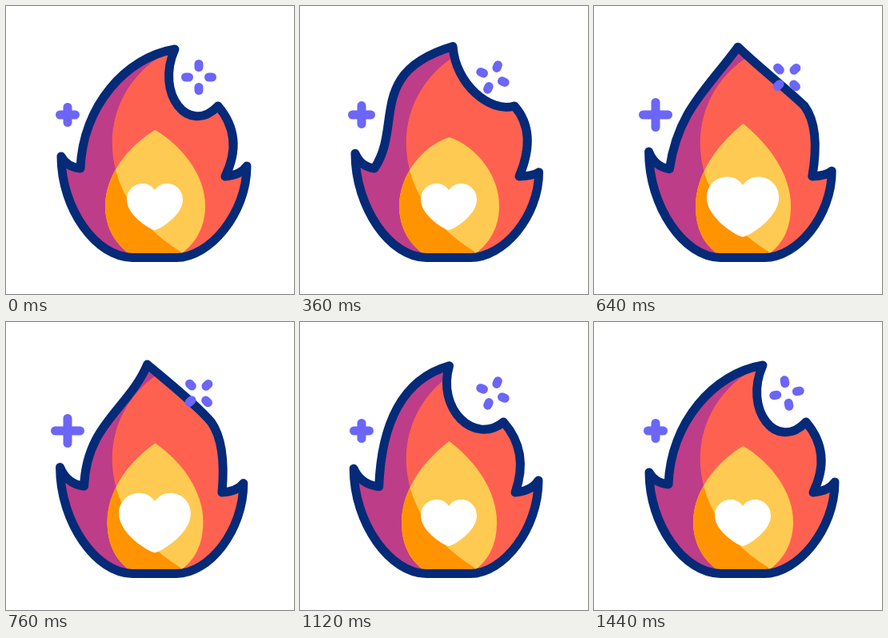
Write an HTML page with a canvas that moves like this. It is 360 px wide and 360 px high and loops after 1480 ms.

```html
<!DOCTYPE html>
<html lang="en">
<head>
<meta charset="utf-8">
<title>Flame</title>
<style>
html, body { margin: 0; width: 100%; height: 100%; overflow: hidden; background: #fff; }
canvas { display: block; width: 360px; height: 360px; }
</style>
</head>
<body>
<canvas id="stage" width="360" height="360"></canvas>
<script>
const ctx = document.getElementById('stage').getContext('2d');
const LOOP = 1480, STEP = 40, FLOOR = 314.5;
const NAVY = '#042a78', RED = '#ff6150', PLUM = '#bd3d88';
const YELLOW = '#ffca52', ORANGE = '#ff9300', VIOLET = '#6b66f6';

const progress = (t, from, to) => Math.min(1, Math.max(0, (t - from) / (to - from)));
const ramp = (t, from, to) => {
  const u = progress(t, from, to);
  return u * u * (3 - 2 * u);
};
const bump = (t, from, to) => Math.sin(Math.PI * progress(t, from, to)) ** 2;
const add = ([x, y], dx, dy) => [x + dx, y + dy];

function flamePath(t) {
  const lean = (1 - (1 - progress(t, 0, 940)) ** 1.6) * (1 - ramp(t, 940, 1400));
  const bite = 1 - ramp(t, 0, 740) + ramp(t, 740, 1240);
  const bulge = Math.sin(bite * Math.PI / 2);
  const ripple = bump(t, 0, 760);
  const lift = bump(t, 0, 960);
  const sway = bump(t, 520, 1400);

  const tip = [211 - 37 * lean, 54 - 4 * lift + sway];
  const notchL = [93 + 8 * sway, 203 + 4 * sway];
  const spikeL = [69 - 2.5 * sway, 188 - 7 * lean];
  const spikeR = [301 - 4.5 * lean, 200 + 9 * lift - 3 * sway];
  const notchR = [274 - 7 * sway, 213];
  const shoulder = [265 - 15 * sway + 3 * ripple, 125];

  const elbow = (spike, notch) => [
    spike[0] + 0.28 * (notch[0] - spike[0]),
    spike[1] + 0.88 * (notch[1] - spike[1])
  ];
  const drop = spike => [spike[0], spike[1] + 0.52 * (FLOOR - spike[1])];

  const path = new Path2D();
  path.moveTo(...tip);
  path.bezierCurveTo(
    ...add(tip, -61 + 38 * (1 - bite) ** 1.5 - 60 * ripple, 10 + 46 * (1 - bite)),
    ...add(notchL, 3 + 33 * ripple, -78 + 25 * ripple),
    ...notchL);
  path.quadraticCurveTo(...elbow(spikeL, notchL), ...spikeL);
  path.bezierCurveTo(...drop(spikeL), 113, FLOOR, 158, FLOOR);
  path.lineTo(213, FLOOR);
  path.bezierCurveTo(254, FLOOR, ...drop(spikeR), ...spikeR);
  path.quadraticCurveTo(...elbow(spikeR, notchR), ...notchR);
  path.quadraticCurveTo(...add(shoulder, 19 + 14 * bulge, 27 + 12 * bite), ...shoulder);
  path.bezierCurveTo(
    ...add(shoulder, -18 - 18 * bulge, -22 + 60 * bite),
    ...add(tip, 24 - 49 * bite ** 1.3, 20 + 36 * bulge),
    ...tip);
  path.closePath();
  return path;
}

function corePath(t) {
  const sink = bump(t, 200, 520) + bump(t, 790, 1070);
  const rise = bump(t, 420, 860) + bump(t, 1020, 1320);
  const top = 155 + 9 * sink - 8 * rise;
  const inset = Math.min(3, 6 * rise);
  const left = 124 + inset, right = 249 - inset;
  const path = new Path2D();
  path.moveTo(186.5, top);
  path.bezierCurveTo(151, 176, left, 213, left, 250);
  path.bezierCurveTo(left, 275, 135, 297, 157, 312);
  path.lineTo(216, 312);
  path.bezierCurveTo(238, 297, right, 275, right, 250);
  path.bezierCurveTo(right, 213, 222, 176, 186.5, top);
  return path;
}

const shade = new Path2D('M205 56C110 105 103 236 218 307L218 340H20V20H205Z');
const heart = new Path2D('M0 29C-5 29-35 11-35-9C-35-29-10-36 0-21C10-36 35-29 35-9C35 11 5 29 0 29Z');

function fill(path, color) {
  ctx.fillStyle = color;
  ctx.fill(path);
}

function line(x1, y1, x2, y2) {
  ctx.beginPath();
  ctx.moveTo(x1, y1);
  ctx.lineTo(x2, y2);
  ctx.stroke();
}

function drawFlame(t) {
  const flame = flamePath(t), core = corePath(t);
  ctx.save();
  ctx.clip(flame);
  fill(flame, RED);
  fill(shade, PLUM);
  fill(core, YELLOW);
  ctx.clip(core);
  fill(shade, ORANGE);
  ctx.restore();

  ctx.save();
  const scale = 1 + 0.29 * (ramp(t, 380, 600) - ramp(t, 740, 940));
  ctx.translate(186, 251);
  ctx.scale(scale, scale);
  fill(heart, '#fff');
  ctx.restore();

  ctx.strokeStyle = NAVY;
  ctx.lineWidth = 11;
  ctx.stroke(flame);
}

function drawSparkles(t) {
  ctx.strokeStyle = VIOLET;
  const arm = 9.5 + 6 * (ramp(t, 260, 520) - ramp(t, 760, 1000));
  line(77 - arm, 136, 77 + arm, 136);
  line(77, 136 - arm, 77, 136 + arm);

  ctx.save();
  ctx.translate(241, 89);
  const degrees = 46 * ramp(t, 200, 520) - 56 * ramp(t, 960, 1320);
  ctx.rotate(degrees * Math.PI / 180);
  for (let i = 0; i < 4; i++) {
    line(0, -12.5, 0, -16.5);
    ctx.rotate(Math.PI / 2);
  }
  ctx.restore();
}

function render(now) {
  const time = Math.floor(now % LOOP / STEP) * STEP;
  const t = time < 2 * STEP ? 0 : time;
  ctx.fillStyle = '#fff';
  ctx.fillRect(0, 0, 360, 360);
  ctx.lineCap = ctx.lineJoin = 'round';
  drawFlame(t);
  drawSparkles(t);
}

const start = performance.now();
function tick() {
  render(performance.now() - start);
  requestAnimationFrame(tick);
}
tick();
</script>
</body>
</html>
```
